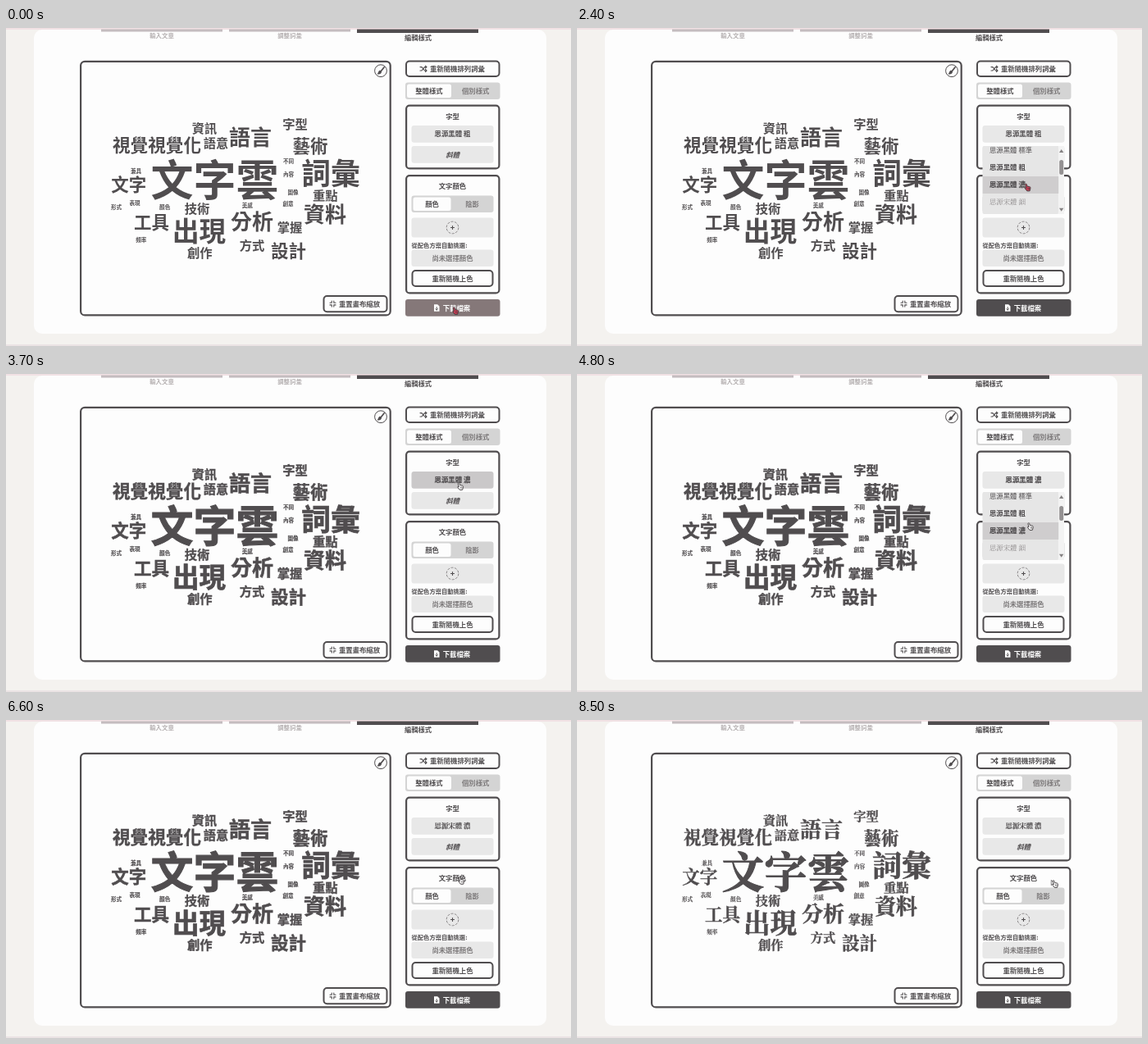
Recreate the animation shown at these times as an HTML page. Size 689 by 388 pixels, loop 8600 ms.

```html
<!DOCTYPE html>
<html lang="zh-Hant">
<head>
<meta charset="utf-8">
<title>文字雲</title>
<style>
html, body { margin: 0; width: 100%; height: 100%; overflow: hidden; background: #f4f2ef; }
svg { display: block; width: 100vw; height: 100vh; }
text { font-family: "Noto Sans CJK TC", "Noto Sans CJK", sans-serif; font-weight: 700; white-space: pre; }
.serif { font-family: "Noto Serif CJK TC", "Noto Serif CJK", "Noto Serif", serif; }
</style>
</head>
<body>
<svg id="stage" viewBox="0 0 689 388" xmlns="http://www.w3.org/2000/svg">
  <defs><clipPath id="listClip"><rect x="494.5" y="144" width="93" height="83"/></clipPath></defs>
</svg>
<script>
const LOOP = 8600, INK = '#504d4f', MUTED = '#7d7a7b', PALE = '#e8e8e8', PAPER = '#fdfdfd', ROW = 21;
const stage = document.getElementById('stage');

function add(tag, attrs, parent = stage) {
  const el = document.createElementNS(stage.namespaceURI, tag);
  for (const key in attrs) el.setAttribute(key, attrs[key]);
  return parent.appendChild(el);
}
const box = (x1, y1, x2, y2, fill, rx = 3, parent) =>
  add('rect', { x: x1, y: y1, width: x2 - x1, height: y2 - y1, rx, fill }, parent);
function frame(x1, y1, x2, y2, line, rx = 4) {
  const h = line / 2;
  const el = box(x1 + h, y1 + h, x2 - h, y2 - h, PAPER, rx);
  el.setAttribute('stroke', INK);
  el.setAttribute('stroke-width', line);
}
// The y value is the middle of the glyph square.
function label(str, x, y, size = 8.4, fill = INK, anchor = 'middle', parent) {
  const el = add('text', { x, y: y + size * 0.38, 'font-size': size, fill, 'text-anchor': anchor }, parent);
  el.textContent = str;
  return el;
}
const icon = (d, x, y, color = INK, width = 1.1, parent) => add('path', {
  d, transform: `translate(${x} ${y})`, fill: 'none', stroke: color, 'stroke-width': width,
  'stroke-linecap': 'round', 'stroke-linejoin': 'round'
}, parent);

// Some systems carry no black cut; a thin outline then supplies the weight.
const probe = document.createElement('canvas').getContext('2d', { willReadFrequently: true });
function inkOf(font) {
  probe.clearRect(0, 0, 200, 80);
  probe.font = font;
  probe.fillText('雲字', 0, 60);
  return probe.getImageData(0, 0, 200, 80).data.reduce((sum, v) => sum + v, 0);
}
const hasBlack = family => inkOf(`900 50px ${family}`) > inkOf(`700 50px ${family}`) * 1.02;
const black = {
  sans: hasBlack('"Noto Sans CJK TC", sans-serif'),
  serif: hasBlack('"Noto Serif CJK TC", serif')
};
function setFace(el, family, weight) {
  const outline = weight === 900 && !black[family] ? el.getAttribute('font-size') * 0.02 : 0;
  el.setAttribute('class', family);
  el.style.fontWeight = weight;
  el.style.stroke = outline ? el.getAttribute('fill') : 'none';
  el.style.strokeWidth = outline;
}

// Page and card
box(34, 2, 659, 373, PAPER, 10);
box(0, 0, 689, 2, '#f1e1e4', 0);
box(0, 386, 689, 388, '#ebe3e4', 0);
box(116, 1.5, 264, 4.5, '#c4bcbf', 0);
box(272, 1.5, 420, 4.5, '#c4bcbf', 0);
box(428, 1.5, 576, 6, INK, 0);
label('輸入文章', 190, 9, 7.4, '#b5b0b1');
label('調整詞彙', 346, 9, 7.4, '#b5b0b1');
label('編輯樣式', 502.5, 12.3, 8.3);

// Drawing area
frame(90, 39.7, 469.8, 351.5, 2.2, 5);
add('circle', { cx: 457, cy: 52.2, r: 7.4, fill: PAPER, stroke: INK, 'stroke-width': 1 });
icon('M4-4L0 1', 457, 52, INK, 1.8);
add('path', { d: 'M456 51.5l2 2c0 2.5-3 3.5-5.5 2.7 1.7-.8 1-3.5 3.5-4.7z', fill: INK });
frame(386.5, 326, 465.5, 347.3, 2);
icon('M-3.5-1.3H-1.3V-3.5M3.5-1.3H1.3V-3.5M-3.5 1.3H-1.3V3.5M3.5 1.3H1.3V3.5', 398.5, 336.6);
label('重置畫布縮放', 431, 336.6);

// Side controls
frame(487, 39.5, 602.5, 60, 2);
icon('M-4-2.2H-2L1.5 2.2H4M-4 2.2H-2L1.5-2.2H4M2.5-3.7L4-2.2 2.5-.7M2.5.7L4 2.2 2.5 3.7', 509, 49.8);
label('重新隨機排列詞彙', 550.5, 49.8);
function toggle(x1, y1, x2, y2, split, on, off) {
  box(x1, y1, x2, y2, '#d4d4d4');
  box(x1 + 2, y1 + 2, split, y2 - 2, PAPER, 2.5);
  const y = (y1 + y2) / 2;
  label(on, (x1 + 2 + split) / 2, y);
  label(off, (split + x2) / 2, y, 8.4, MUTED);
}
toggle(487, 66.5, 602.5, 87, 543, '整體樣式', '個別樣式');

frame(487, 93.5, 602.5, 172.5, 2.2);
label('字型', 544.5, 107.5);
const fontButton = box(494.5, 119, 594.5, 139.8, PALE);
const fontName = label('', 544.5, 129.3);
box(494.5, 144, 594.5, 164.8, PALE);
label('斜體', 544.5, 154.5).style.fontStyle = 'italic';

frame(487, 179, 602.5, 324.5, 2.2);
label('文字顏色', 544.5, 193);
toggle(494.5, 204.5, 594.5, 225, 542.5, '顏色', '陰影');
box(494.5, 231.5, 594.5, 255.5, PALE);
add('circle', { cx: 544.5, cy: 243.5, r: 7.3, fill: 'none', stroke: MUTED, 'stroke-width': 0.9, 'stroke-dasharray': '3 1.6' });
icon('M-2 0H2M0-2V2', 544.5, 243.5);
label('從配色方案自動挑選:', 494.5, 265.3, 7.3, INK, 'start');
box(494.5, 270.5, 594.5, 291, PALE);
label('尚未選擇顏色', 544.5, 280.7, 8.4, MUTED);
frame(494.5, 295, 594.5, 316, 2);
label('重新隨機上色', 544.5, 305.5);
const download = box(487, 331, 602.5, 351.8, INK);
add('path', { d: 'M522 337.3h4.2l2.3 2.3v6.2h-6.5z', fill: '#fff' });
icon('M0-1.5V2M-1.3.8L0 2 1.3.8', 525.2, 342, INK, 0.9);
label('下載檔案', 549.5, 341.4, 8.4, '#fff');

// Word cloud: text, centre x, centre y, size, loads late
const words = [
  ['視覺視覺化', 184, 143, 21.6], ['文字雲', 254.5, 184.8, 52, 1], ['語言', 298, 133, 26, 1],
  ['資訊', 242, 122.3, 15.2], ['語意', 256, 139.8, 15.2], ['字型', 352.5, 117, 15.3, 1],
  ['藝術', 371, 144, 21.4], ['詞彙', 396, 177, 36], ['不同', 344.5, 162, 6.6],
  ['內容', 344.5, 178, 6.6], ['圖像', 350, 200, 6.6], ['創意', 344, 214, 6.6],
  ['重點', 389.3, 203.7, 15.3], ['資料', 389, 227.3, 26], ['掌握', 346, 243, 15.3, 1],
  ['分析', 300, 236, 26, 1], ['美感', 294.3, 216, 6.6], ['方式', 300, 264.7, 15.3],
  ['設計', 344.5, 272.3, 21.5], ['技術', 233, 220.3, 15.3, 1], ['出現', 235.5, 248, 32.6],
  ['創作', 236.3, 274, 15.3, 1], ['工具', 177.5, 237, 21.5, 1], ['文字', 149.7, 190.5, 21.5, 1],
  ['兼具', 158.5, 174, 6.6], ['形式', 134.5, 218, 6.6], ['表現', 157, 213.3, 6.6],
  ['顏色', 193.7, 218, 6.6], ['頻率', 164.8, 258, 6.6]
].map(([str, x, y, size, late]) => ({ el: label(str, x, y, size), late }));

// Font list
const list = add('g', {});
box(494.5, 144, 587.5, 227, '#e6e6e6', 2, list);
box(587, 144, 594, 227, '#f3f3f3', 0, list);
add('path', { d: 'M588 152l2.7-4 2.7 4zM588 219.8l2.7 4 2.7-4z', fill: '#858283' }, list);
const thumb = box(588.2, 155, 593.2, 173, '#949192', 2.5, list);
const rows = add('g', {}, add('g', { 'clip-path': 'url(#listClip)' }, list));
const hoverRow = box(494.5, 0, 587.5, ROW, '#cfcdce', 0, rows);
[
  ['思源黑體 細', 'sans', 300], ['思源黑體 標準', 'sans', 400], ['思源黑體 粗', 'sans', 700], ['思源黑體 濃', 'sans', 900],
  ['思源宋體 細', 'serif', 300], ['思源宋體 標準', 'serif', 400], ['思源宋體 粗', 'serif', 700], ['思源宋體 濃', 'serif', 900],
  ['朱古力黑體 標準', 'sans', 400], ['霞鶩文楷 標準', 'sans', 400]
].forEach(([name, family, weight], i) => {
  const el = label(name, 503, 154.3 + i * ROW, 8.4, weight === 300 ? '#8d898a' : INK, 'start', rows);
  setFace(el, family, weight);
});

// Pointer
const pointer = add('g', {});
const arrow = add('path', { d: 'M-6-6V2L-4 .3 0 0z', fill: '#fff', stroke: INK, 'stroke-width': 0.9 }, pointer);
const hand = add('path', {
  d: 'M-3.2-5.2c1-.8 1.8 0 2 .9l.5 2.5 3.4.5c1.4.3 1.8 1 1.7 2.2L4 3.6 3.3 5.6H-.9L-4 1.6c-.5-1 .5-1.6 1.4-.9l.5.5-1.4-5c-.1-.6 0-1.1.3-1.4z',
  stroke: '#3f3a3c', 'stroke-width': 1.2, 'stroke-linejoin': 'round'
}, pointer);
icon('M.8 1V3M2.5 1V3', 0, 0, '#3f3a3c', 0.8, pointer);

const path = [
  [0, 548, 345], [250, 548, 345], [850, 556, 138], [1400, 556, 141], [1900, 549, 191], [2400, 549.5, 194.5],
  [2900, 549.5, 194.5], [3500, 554, 137], [4350, 554, 137], [4950, 552.5, 195], [6250, 552.5, 195],
  [6700, 555.5, 196], [7300, 555.5, 196], [7800, 583, 200], [LOOP, 583, 200]
];
const scrolling = [[0, 0], [1900, 0], [2200, 26], [5200, 26], [5500, 64], [5800, 113], [LOOP, 113]];

function sample(keys, t, ease = k => k) {
  const i = Math.max(1, keys.findIndex(key => key[0] >= t));
  const a = keys[i - 1], b = keys[i];
  const k = ease((t - a[0]) / (b[0] - a[0]));
  return a.slice(1).map((v, n) => v + (b[n + 1] - v) * k);
}
const smooth = k => k * k * (3 - 2 * k);
const within = (t, ...spans) => spans.some(([from, to]) => t >= from && t < to);
const show = (el, on) => el.setAttribute('visibility', on ? 'visible' : 'hidden');

function faceOf(t, late) {
  if (t < 3300) return ['sans', 700];
  if (t < 7250) return ['sans', 900];
  return ['serif', late && t < 7500 ? 600 : 900];
}
function chosenFont(t) {
  if (t < 2800) return ['思源黑體 粗', 'sans', 700];
  if (t < 6250) return ['思源黑體 濃', 'sans', 900];
  return ['思源宋體 濃', 'serif', 900];
}

function draw(t) {
  const [x, y] = sample(path, t, smooth);
  const [scroll] = sample(scrolling, t);
  const open = within(t, [1000, 2800], [4350, 6250]);

  pointer.setAttribute('transform', `translate(${x} ${y}) scale(.78)`);
  hand.setAttribute('fill', within(t, [0, 300], [2300, 2800], [5600, 6250]) ? '#cc3c55' : '#fff');
  show(arrow, t >= 7600);
  download.setAttribute('fill', y > 331 ? '#857879' : INK);
  fontButton.setAttribute('fill', y > 119 && y < 143 ? '#cac8c9' : PALE);

  const [name, family, weight] = chosenFont(t);
  fontName.textContent = name;
  setFace(fontName, family, weight);
  for (const { el, late } of words) setFace(el, ...faceOf(t, late));

  show(list, open);
  rows.setAttribute('transform', `translate(0 ${-scroll})`);
  thumb.setAttribute('y', 155 + scroll * 0.23);
  // The highlighted row trails the scroll a little.
  const [seen] = sample(scrolling, Math.max(0, t - 300));
  const index = Math.round((y + seen - 154) / ROW);
  hoverRow.setAttribute('y', 144 + index * ROW);
  hoverRow.setAttribute('height', y > 144 ? ROW : 0);
}

function tick() {
  draw(performance.now() % LOOP);
  requestAnimationFrame(tick);
}
tick();
</script>
</body>
</html>
```
